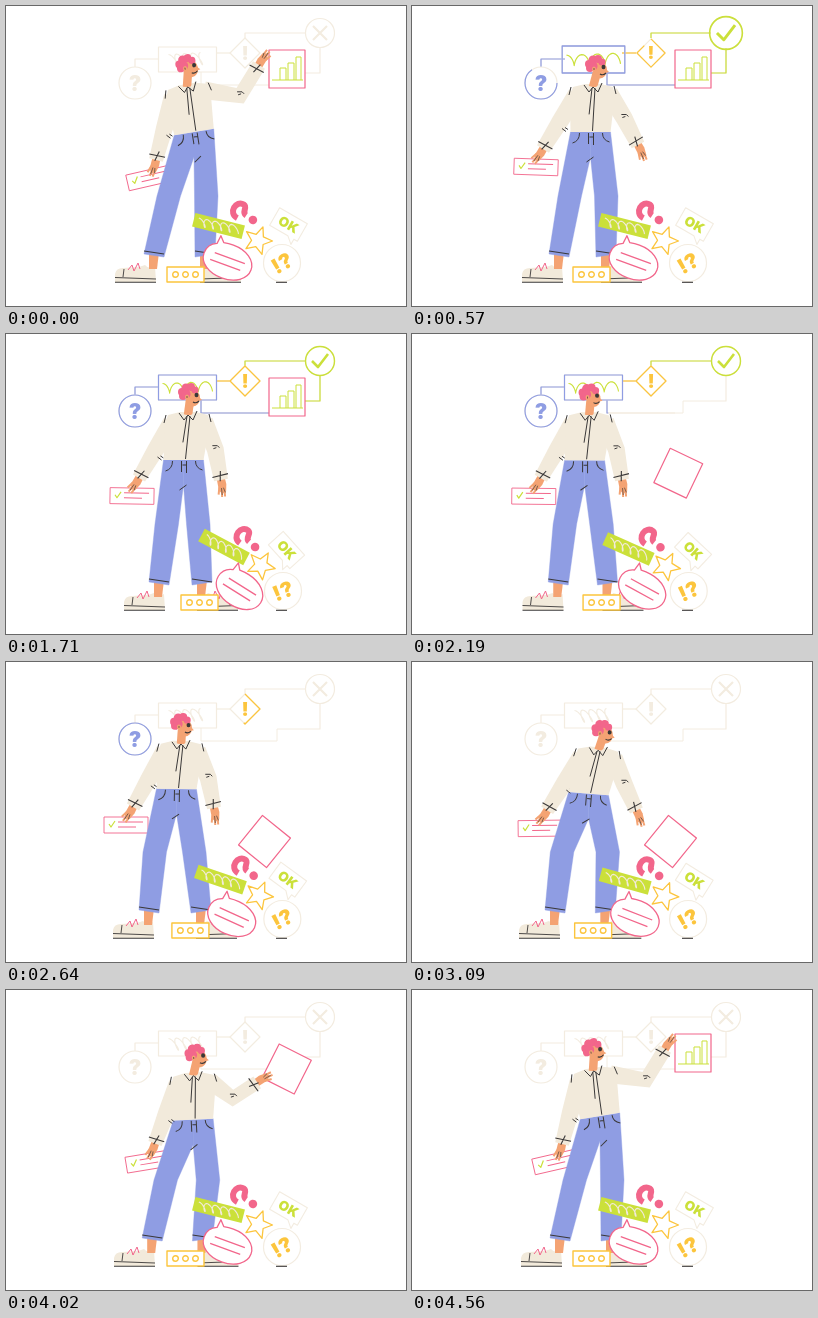
Write an HTML page with a canvas that moves like this. It is 400 by 300 pixels and loops after 4.59 s.

```html
<!DOCTYPE html>
<html lang="en">
<head>
<meta charset="utf-8">
<title>Flow chart</title>
<style>
html, body { margin: 0; width: 100%; height: 100%; overflow: hidden; background: #fff; }
canvas { display: block; width: 400px; height: 300px; }
</style>
</head>
<body>
<canvas id="stage"></canvas>
<script>
const canvas = document.getElementById('stage');
const ctx = canvas.getContext('2d');
const ratio = window.devicePixelRatio || 1;
canvas.width = 400 * ratio;
canvas.height = 300 * ratio;

const LOOP = 4590, STEP = 30;
const BLUE = '#8f9de3', PINK = '#f2668b', GREEN = '#cbe03a', YELLOW = '#fcc53d';
const CREAM = '#f2eadb', DARK = '#3a3838', SKIN = '#f4a373', PALE = '#f3ece0';
const RAD = Math.PI / 180;

const ramp = (t, a, b) => Math.min(1, Math.max(0, (t - a) / (b - a)));
const pulse = (t, a, b, size) => 1 + size * Math.sin(Math.PI * ramp(t, a, b));
const level = (t, on, off, span = 170) => ramp(t, on, on + span) - ramp(t, off, off + span);
const mix = (a, b, k) => [a[0] + (b[0] - a[0]) * k, a[1] + (b[1] - a[1]) * k];
const turn = ([x, y], deg) => {
  const c = Math.cos(deg * RAD), s = Math.sin(deg * RAD);
  return [x * c - y * s, x * s + y * c];
};
const add = (a, b) => [a[0] + b[0], a[1] + b[1]];

// Periodic cubic through the keys, flat at every extreme
function track(keys, values, t) {
  const n = keys.length;
  const time = i => keys[(i + n) % n] + LOOP * Math.floor(i / n);
  const value = i => values[(i + n) % n];
  const slope = i => {
    const a = (value(i) - value(i - 1)) / (time(i) - time(i - 1));
    const b = (value(i + 1) - value(i)) / (time(i + 1) - time(i));
    return a * b > 0 ? 2 * a * b / (a + b) : 0;
  };
  let i = n - 1;
  while (i > 0 && keys[i] > t) i--;
  const h = time(i + 1) - time(i), u = (t - time(i)) / h, v = 1 - u;
  return value(i) * (1 + 2 * u) * v * v + slope(i) * h * u * v * v
    + value(i + 1) * u * u * (3 - 2 * u) - slope(i + 1) * h * u * u * v;
}

const POSE_KEYS = [0, 570, 1110, 1710, 2640, 3540];
const POSE = {
  headX: [183, 186, 195, 185, 177, 207], headY: [62, 63, 63, 63, 65, 78],
  neckX: [181, 181, 191, 182, 175, 198], neckY: [77, 77, 77, 77, 78, 90],
  lean: [-9, 0, 0, 0, 1, 8], bend: [20, -1, -1, -3, -3, 7],
  leftX: [150, 131, 144, 133, 127, 145], leftY: [154, 143, 147, 144, 145, 152],
  rightX: [253, 226, 231, 215, 208, 244], rightY: [59, 139, 142, 146, 146, 151],
  waistX: [188, 178.5, 189, 177.5, 170.5, 184], waistY: [126, 126, 126, 126, 127, 136],
  kneeL: [163, 158, 170, 161, 149, 153], kneeR: [200, 194, 199.5, 192, 188, 203],
  ankleL: [148, 147, 164, 153, 143, 143], ankleR: [199, 194, 198, 196, 195, 192],
  toeL: [109, 110, 131, 118, 107, 107], tilt: [0, 0, -5, 0, 0, 0],
  cardTurn: [-13, 2, 0, 1, 0, -2], push: [0, 0, 0.9, 1, 0.35, 0]
};
const CHART_KEYS = [0, 1900, 2380, 3300, 3540, 4230, 4400];
const CHART = {
  x: [281, 281, 258.5, 258.5, 255, 288, 281],
  y: [63, 63, 179.5, 179.5, 181, 50, 62.5],
  turn: [0, 0, 39, 39, 45, 14, 0]
};

function sample(keys, tracks, t) {
  const out = {};
  for (const name in tracks) out[name] = track(keys, tracks[name], t);
  return out;
}

function at(x, y, deg, draw, scale = 1) {
  ctx.save();
  ctx.translate(x, y);
  ctx.rotate(deg * RAD);
  ctx.scale(scale, scale);
  draw();
  ctx.restore();
}
function paint(shape, fill, stroke, width = 1.1) {
  if (fill) { ctx.fillStyle = fill; ctx.fill(shape); }
  if (stroke) { ctx.strokeStyle = stroke; ctx.lineWidth = width; ctx.stroke(shape); }
}
function poly(points, closed = true) {
  const p = new Path2D();
  points.forEach(([x, y]) => p.lineTo(x, y));
  if (closed) p.closePath();
  return p;
}
function disc(x, y, rx, ry = rx) {
  const p = new Path2D();
  p.ellipse(x, y, rx, ry, 0, 0, 2 * Math.PI);
  return p;
}
function box(w, h) {
  const p = new Path2D();
  p.rect(-w / 2, -h / 2, w, h);
  return p;
}
const line = (d, color, width = 1.1) => paint(new Path2D(d), null, color, width);
const segment = (points, color, width = 1) => paint(poly(points, false), null, color, width);

function label(text, size, color) {
  ctx.font = `900 ${size}px Inter, sans-serif`;
  ctx.textAlign = 'center';
  ctx.textBaseline = 'alphabetic';
  ctx.fillStyle = color;
  ctx.fillText(text, 0, size * 0.36);
}
function squiggle(width, height, loops, color, slant = 0) {
  const p = new Path2D();
  for (let i = 0; i <= 60; i++) {
    const u = i / 60, a = u * loops * 2 * Math.PI;
    p.lineTo((u - 0.5) * width + Math.sin(a) * 2.2 + Math.cos(a) * slant,
      -Math.cos(a) * height - u * 2 + 1);
  }
  paint(p, null, color, 1.1);
}
// Pale outline with the lit part traced over it
function trace(shape, length, color, amount, width = 1.2) {
  paint(shape, null, PALE, 1.2);
  if (amount <= 0) return;
  ctx.save();
  if (amount < 1) ctx.setLineDash([length * amount, length * 2]);
  paint(shape, null, color, width);
  ctx.restore();
}

function drawFlow(t) {
  const wire = (d, length, color, on, off) =>
    trace(new Path2D(d), length, color, level(t, on, off), 1.2);
  const tone = (amount, color) => amount > 0.4 ? color : PALE;

  line('M195 66V79H271V67H299', PALE, 1);
  wire('M314 42V67H299', 40, GREEN, 60, 2020);
  if (level(t, 60, 2050) > 0) wire('M195 66V79H263', 81, BLUE, 60, 2050);
  wire('M299 27H239V32', 65, GREEN, 300, 2330);
  wire('M224 47H210', 14, YELLOW, 380, 2400);
  wire('M153 53H129V61', 32, BLUE, 400, 2440);

  const check = level(t, 220, 2230);
  at(314, 27, 0, () => {
    trace(disc(0, 0, 14.5), 92, GREEN, check, 1.4);
    if (check > 0.5) line('M-8 0L-2 6L8 -7', GREEN, 2.6);
    else line('M-7 -7L7 7M7 -7L-7 7', PALE, 2.2);
  }, pulse(t, 380, 740, 0.13) * pulse(t, 2200, 2450, 0.1));

  const alert = level(t, 350, 2520, 250);
  at(239, 47, 0, () => {
    trace(poly([[0, -15], [15, 0], [0, 15], [-15, 0]]), 85, YELLOW, alert);
    label('!', 19, tone(alert, YELLOW));
  }, pulse(t, 450, 690, -0.06));

  const board = level(t, 340, 2380);
  at(181.5, 53.5, 0, () => {
    trace(box(58, 25), 166, BLUE, board);
    if (board > 0.4) squiggle(50, 5, 3.5, GREEN);
    else squiggle(32, 6, 4, PALE, -3);
  }, pulse(t, 450, 690, 0.08));

  const ask = level(t, 460, 2740);
  at(129, 77, 0, () => {
    trace(disc(0, 0, 16), 101, BLUE, ask);
    label('?', 21, tone(ask, BLUE));
  });
}

function drawChart(t) {
  const c = sample(CHART_KEYS, CHART, t);
  at(c.x, c.y, c.turn, () => {
    paint(box(36, 38), '#fff', PINK, 1.2);
    ctx.globalAlpha = 1 - ramp(t, 1900, 2150) + ramp(t, 4150, 4380);
    line('M-15 11H16M-7 11V-1H-1V11M1 11V-6H7V11M9 11V-12H14V11', GREEN, 1);
  });
}

function drawHandCard(p) {
  at(p.leftX - 7, p.leftY + 18, p.cardTurn, () => {
    paint(box(44, 16), '#fff', PINK, 0.9);
    line('M-17 -1L-15 2L-11 -4', GREEN, 1.2);
    line('M-8 -3H17M-8 2H10', PINK, 1);
  });
}

// Toe at the origin, sole on the ground
function drawShoe(toe, side, tilt = 0) {
  at(toe, 276, tilt, () => {
    ctx.scale(side, 1);
    paint(new Path2D('M0 0V-8Q1 -14 8 -14L24 -15L30 -17Q34 -12 40 -16L41 0Z'), CREAM);
    line('M0 -4.5L41 -3M9 -13L8 -5', DARK, 0.9);
    line('M0 0.3H41', DARK, 1.1);
    line('M13 -12L17 -17L19 -11L23 -19L25 -13', PINK, 1);
  });
}

function limb(joints, widths, color) {
  const left = [], right = [];
  joints.forEach((j, i) => {
    const a = joints[Math.max(0, i - 1)], b = joints[Math.min(joints.length - 1, i + 1)];
    const d = Math.hypot(b[0] - a[0], b[1] - a[1]) || 1;
    const n = [(a[1] - b[1]) / d * widths[i] / 2, (b[0] - a[0]) / d * widths[i] / 2];
    left.push(add(j, n));
    right.unshift([j[0] - n[0], j[1] - n[1]]);
  });
  paint(poly(left.concat(right)), color);
}

function drawArm(shoulder, elbow, wrist, creases) {
  const angle = Math.atan2(wrist[1] - elbow[1], wrist[0] - elbow[0]) / RAD;
  at(wrist[0], wrist[1], angle, () => {
    paint(poly([[-2, -4], [5, -4.5], [12, -3], [14, 1], [10, 4], [-2, 4]]), SKIN);
    line('M7 3L14 5M9 -2L17 -1M10 1L17 2', SKIN, 2);
    line('M8 1L15 1.5M8 -1L13 -2', DARK, 0.6);
  });
  limb([shoulder, elbow, wrist], [18, 17, 14], CREAM);
  at(wrist[0], wrist[1], angle, () => line('M-5 -8L-4 8M-9 -1L1 1', DARK, 1.1));
  at(elbow[0], elbow[1], 0, () => line(creases, DARK, 1));
}

function drawLegs(p, waistL, waistR) {
  const crotch = [p.waistX, p.waistY + 25];
  const leg = (hip, knee, ankle, side) => {
    paint(poly([[ankle - 5, 246], [ankle + 5, 246], [ankle + 3, 263], [ankle - 5, 263]]), SKIN);
    paint(poly([hip, [knee + side * 12, 190], [ankle + side * 10, 248],
      [ankle - side * 10, 251], [knee - side * 11.5, 190], crotch,
      [p.waistX, p.waistY]]), BLUE, BLUE, 0.4);
    segment([[ankle - 10, 245], [ankle + 10, 248]], DARK, 1.1);
  };
  drawShoe(p.ankleR + 36, -1);
  leg(waistR, p.kneeR, p.ankleR, 1);
  drawShoe(p.toeL, 1, p.tilt);
  leg(waistL, p.kneeL, p.ankleL, -1);
  at(p.waistX, p.waistY, p.lean, () => {
    line('M-11 1Q-11 9 -18 11M12 1Q12 8 19 10', DARK, 1);
    line('M-2 1V12M3 1V13M-1 5H3', DARK, 1);
    line('M-4 30L3 25', DARK, 1);
  });
}

function drawHead(p) {
  segment([[p.headX - 1, p.headY + 3], [p.neckX, p.neckY + 4]], SKIN, 8.5);
  at(p.headX, p.headY, p.lean, () => {
    paint(disc(2, 1, 7, 8.5), SKIN);
    paint(poly([[7, -1], [11, 3], [7, 4]]), SKIN);
    for (const [x, y, r] of [[-8, -1, 4], [-9, -5, 4], [-5, -9, 4.5], [0, -10, 4], [4, -7, 3.6], [-5, -3, 4.6]])
      paint(disc(x, y, r), PINK);
    paint(disc(-4, 0, 2, 2.5), SKIN);
    paint(disc(5.5, -2, 2, 2.2), DARK);
    line('M2 5Q5 7 8 4', DARK, 1.1);
    line('M-4 -1V1', DARK, 0.7);
  });
}

function drawPerson(p) {
  const neck = [p.neckX, p.neckY], waist = [p.waistX, p.waistY];
  const fromNeck = (x, y) => add(neck, turn([x, y], p.lean));
  const fromWaist = (x, y) => add(waist, turn([x, y], p.lean));
  const waistL = fromWaist(-20, 0), waistR = fromWaist(20, 0);
  const shoulderL = fromNeck(-16, 11), shoulderR = fromNeck(16, 10);
  const wristL = [p.leftX, p.leftY], wristR = [p.rightX, p.rightY];
  const reach = Math.hypot(wristR[0] - shoulderR[0], wristR[1] - shoulderR[1]);
  const elbowR = add(mix(shoulderR, wristR, 0.5), [
    -(wristR[1] - shoulderR[1]) / reach * p.bend,
    (wristR[0] - shoulderR[0]) / reach * p.bend]);

  drawLegs(p, waistL, waistR);
  drawArm(shoulderL, mix(shoulderL, wristL, 0.5), wristL, 'M2 7L6 10M5 6L8 8');
  drawArm(shoulderR, elbowR, wristR, 'M-3 -4L2 -4L4 -2M-2 -1L1 -2');
  paint(poly([fromNeck(-8, 1), fromNeck(-20, 4), fromNeck(-23, 12), waistL, waistR,
    fromNeck(22, 12), fromNeck(20, 4), fromNeck(8, 1)]), CREAM);
  drawHead(p);
  paint(poly([fromNeck(-8, 1), fromNeck(-4, 9), fromNeck(0, 5), fromNeck(5, 9),
    fromNeck(8, 0), fromNeck(3, 4), fromNeck(-3, 4)]), CREAM);
  segment([fromNeck(-9, 2), fromNeck(-4, 9), fromNeck(0, 4), fromNeck(5, 9), fromNeck(9, 0)], DARK);
  segment([fromNeck(-1, 5), mix(fromNeck(-3, 5), fromWaist(-2, 0), 0.6)], DARK);
  segment([fromNeck(2, 5), fromWaist(2, -1)], DARK);
  segment([fromNeck(-22, 4), fromNeck(-24, 12)], DARK);
  segment([fromNeck(21, 3), fromNeck(23, 11)], DARK);
}

function drawPile(k) {
  at(276 + k, 257, 0, () => {
    paint(disc(0, 0, 18.5), '#fff', PALE, 1.2);
    ctx.rotate((-30 + 8 * k) * RAD);
    label('!?', 21, YELLOW);
  });
  line('M270 276.3H281', DARK, 1.1);

  at(282.5 - 2 * k, 218.5 - 2.5 * k, 30 + 18 * k, () => {
    paint(poly([[-16, -10], [16, -10], [16, 10], [12, 10], [12, 16], [5, 10], [-16, 10]]), '#fff', PALE, 1.1);
    label('OK', 13.5, GREEN);
  });

  at(252 + 3 * k, 234.5 - 3 * k, 20 + 10 * k, () => {
    const star = Array.from({ length: 10 }, (_, i) => turn([0, i % 2 ? -6.5 : -14.5], i * 36));
    paint(poly(star), '#fff', YELLOW, 1.3);
  });

  at(238.5 + 3 * k, 208.5 - 2 * k, -57 + 8 * k, () => {
    line('M-7 -4C-8 -15 8 -15 8 -6C8 -1 0 -4 0 2', PINK, 6);
    paint(disc(0, 10, 4.3), PINK);
  });

  at(212.5 + 5.5 * k, 220 - 7 * k, 14 + 14 * k, () => {
    paint(box(51, 14), GREEN);
    squiggle(38, 4, 4.5, CREAM, -2);
  });

  at(179.5 + 14 * k, 268.5, 0, () => {
    paint(box(37, 15), '#fff', YELLOW, 1.4);
    for (const x of [-10, 0, 10]) paint(disc(x, 0, 2.8), null, YELLOW, 1.4);
  });

  at(221.5 + 12 * k, 255.5, 20 + 12 * k, () => {
    paint(new Path2D('M-10 -16.5L-15 -22L-16 -13.5C-22 -11 -25 -6 -25 0C-25 10 -14 17.5 0 17.5C14 17.5 25 10 25 0C25 -10 14 -17.5 0 -17.5Q-5 -17.5 -10 -16.5Z'), '#fff', PINK, 1.3);
    line('M-15 -4H17M-17 4H15', PINK, 1.3);
  });
}

// The arm settles shortly before the loop closes
function poseTime(t) {
  const last = 3540;
  return t <= last ? t : (last + (LOOP - last) * ramp(t, last, 4350)) % LOOP;
}

function render(now) {
  const t = Math.floor((now % LOOP) / STEP) * STEP;
  const pose = sample(POSE_KEYS, POSE, poseTime(t));
  ctx.setTransform(ratio, 0, 0, ratio, 0, 0);
  ctx.lineJoin = 'round';
  ctx.fillStyle = '#fff';
  ctx.fillRect(0, 0, 400, 300);
  drawFlow(t);
  drawChart(t);
  drawHandCard(pose);
  drawPerson(pose);
  drawPile(pose.push);
}

const start = performance.now();
function tick() {
  render(performance.now() - start);
  requestAnimationFrame(tick);
}
tick();
</script>
</body>
</html>
```
